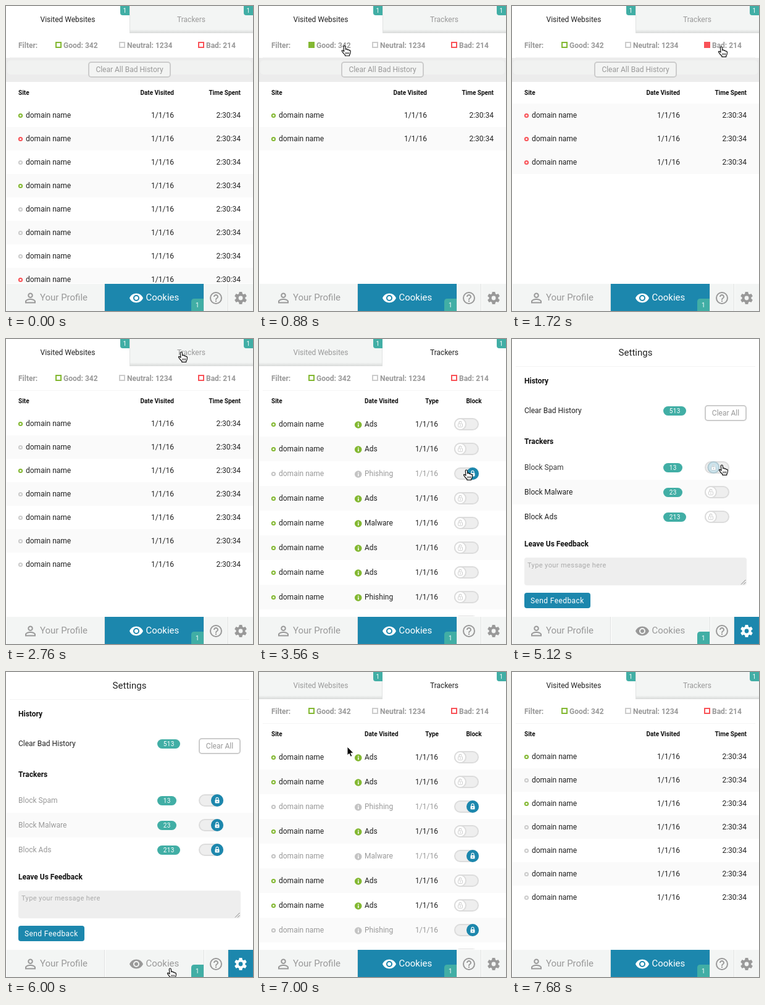
An HTML page for the animation above (9.68 s loop, 400x494 px).

```html
<!DOCTYPE html>
<html lang="en">
<head>
<meta charset="utf-8">
<title>Privacy dashboard</title>
<style>
  html, body { margin: 0; width: 100%; height: 100%; overflow: hidden; background: #fff; }
  svg { display: block; }
  text { font: 12px Roboto, Arial, sans-serif; fill: #222; }
  .b { font-weight: 700; fill: #111; }
  .h { font-size: 10px; font-weight: 700; fill: #111; }
  .mute { fill: #999; }
  .big { font-size: 15px; }
  .tiny { font-size: 10px; fill: #fff; letter-spacing: .4px; }
  .sp { letter-spacing: .4px; }
  .end { text-anchor: end; }
  .mid { text-anchor: middle; }
  .ink { fill: var(--ink, #222); }
  .btn { fill: #fff; stroke: #ccc; stroke-width: 2; }
</style>
</head>
<body>
<svg id="stage" width="400" height="494" viewBox="0 0 400 494"></svg>
<script>
const LOOP = 9680, STEP = 40;
const BLUE = '#1c87ad', TEAL = '#41aea5', PALE = '#f3f5f4', GREY = '#999999', INK = '#222222';
const TINT = { g: '#83b832', n: '#cccccc', b: '#f95257' };

// markup helpers
const text = (x, y, s, c = '') => `<text x="${x}" y="${y}" class="${c}">${s}</text>`;
const rect = (x, y, w, h, fill, more = '') =>
  `<rect x="${x}" y="${y}" width="${w}" height="${h}" fill="${fill}" ${more}/>`;
const stripe = (y, h) => rect(1, y, 399, h, '#fafafa');
const ring = (y, color) =>
  `<circle cx="23.5" cy="${y}" r="2.6" fill="none" stroke="${color}" stroke-width="2"/>`;
const icon = (x, y, d, id, s = 1) =>
  `<path id="${id}" transform="translate(${x - 12 * s} ${y - 12 * s}) scale(${s})" fill="${GREY}" d="${d}"/>`;

const badge = (x, y, size, down) => {
  const d = down ? `M0 0H${size}V${size}H4Q0 ${size} 0 ${size - 4}Z`
                 : `M0 ${size}V5Q0 0 5 0H${size}V${size}Z`;
  return `<g transform="translate(${x} ${y})"><path fill="${TEAL}" d="${d}"/>` +
    text(size / 2, size / 2 + 3.5, '1', 'tiny mid') + '</g>';
};

const lock = (color, open) =>
  `<rect x="-3.5" y="-1" width="7" height="5.5" rx=".8" fill="${open ? 'none' : color}" stroke="${color}" stroke-width="${open ? 1 : 0}"/>
   <path d="M-2 -1V-2.6A2 2 0 0 1 2 -2.6${open ? '' : 'V-1'}" fill="none" stroke="${color}" stroke-width="1.2"/>
   <circle cy="1.7" r=".9" fill="${open ? color : BLUE}"/>`;

const toggle = (x, y) => `<g transform="translate(${x} ${y})">
  <rect x="1" y="-9" width="38" height="18" rx="9" fill="#eee" stroke="#dcdcdc" stroke-width="2"/>
  <g class="knob"><circle r="9" fill="#fff" stroke="#dcdcdc" stroke-width="2"/>${lock('#cfcfcf', true)}
  <g class="on"><circle r="10" fill="${BLUE}"/>${lock('#fff', false)}</g></g></g>`;

const filterBox = (x, kind, label) =>
  `<rect id="box-${kind}" x="${x + 1}" y="59" width="8" height="8" fill="#fff" stroke="${TINT[kind]}" stroke-width="2"/>` +
  text(x + 13, 68, label, 'b mute');

// visited sites
const SITES = [...'gbngnnnbnb'].map((kind, i) => ({ kind, odd: i % 2 }));
const clean = SITES.filter(s => s.kind != 'b').map((s, i) => ({ kind: s.kind, odd: i % 2 }));
const lists = { all: SITES, clean };
for (const k of 'gnb') lists[k] = SITES.filter(s => s.kind == k);

const siteRow = (s, i) => {
  const y = 177 + 38 * i;
  return (s.odd ? stripe(y - 19, 38) : '') + ring(y + .5, TINT[s.kind]) +
    text(32, y + 4, 'domain name') + text(272, y + 4, '1/1/16', 'end') + text(380, y + 4, '2:30:34', 'end');
};

const sites = `<g id="sites">
  ${rect(0, 83, 400, 40, '#ececec')}${rect(2, 88, 396, 23, '#f1f2f1', 'rx="5"')}
  <rect class="btn" x="134" y="91" width="132" height="24" rx="4" style="fill:#f3f4f3"/>
  ${text(200, 107, 'Clear All Bad History', 'mute mid')}
  ${text(20, 144, 'Site', 'h')}${text(272, 144, 'Date Visited', 'h end')}${text(380, 144, 'Time Spent', 'h end')}
  ${Object.keys(lists).map(k => `<g id="list-${k}">${lists[k].map(siteRow).join('')}</g>`).join('')}</g>`;

// trackers
const TYPES = ['Ads', 'Ads', 'Phishing', 'Ads', 'Malware', 'Ads', 'Ads', 'Phishing', 'Ads'];
const trackerRow = (type, i) => {
  const y = 138 + 40 * i;
  return `<g id="track${i}">` + (i % 2 ? stripe(y - 20, 40) : '') + ring(y + .5, 'var(--tint)') +
    text(32, y + 4, 'domain name', 'ink') +
    `<circle cx="160.7" cy="${y + 1}" r="5.8" fill="var(--tint)"/>` +
    rect(160, y + .3, 1.6, 3.8, '#fff') + rect(160, y - 2.2, 1.6, 1.6, '#fff') +
    text(171, y + 4, type, 'ink') + text(290, y + 4, '1/1/16', 'ink end') + toggle(316, y) + '</g>';
};
const trackers = `<g id="trackers">
  ${text(20, 104, 'Site', 'h')}${text(171, 104, 'Date Visited', 'h')}
  ${text(291, 104, 'Type', 'h end')}${text(348, 104, 'Block', 'h mid')}
  ${TYPES.map(trackerRow).join('')}</g>`;

const tab = (x, id, label, edge) => `${rect(x, 0, 200, 44, '#fff')}
  <g id="${id}-off">${rect(x, 0, 200, 43, PALE)}${rect(x, 38, 200, 6, 'url(#sink)')}
  ${rect(edge, 0, 1, 43, '#e0e2e1')}</g>
  <text id="${id}-label" class="mid" x="${x + 100}" y="26">${label}</text>${badge(x + 185, 0, 15, true)}`;

const cookies = `<g id="cookies">${sites}${trackers}
  ${rect(0, 0, 400, 84, '#fff')}${rect(6, 83, 388, 1, '#f5f5f5')}
  ${tab(0, 'tab0', 'Visited Websites', 199)}${tab(200, 'tab1', 'Trackers', 200)}
  ${text(20, 68, 'Filter:', 'b mute')}
  ${filterBox(80, 'g', 'Good: 342')}${filterBox(183, 'n', 'Neutral: 1234')}${filterBox(311, 'b', 'Bad: 214')}</g>`;

// settings
const pill = (y, n) => {
  const w = n > 99 ? 37 : 31;
  return rect(245, y - 7.5, w, 15, TEAL, 'rx="7.5"') + text(245.2 + w / 2, y + 3.7, n, 'tiny mid');
};
const blockRow = ([label, n], i) => {
  const y = 208 + 40 * i;
  return `<g id="block${i}">` + (i % 2 ? stripe(y - 20, 40) : '') +
    text(20, y + 4, label, 'ink') + pill(y + .5, n) + toggle(312, y) + '</g>';
};
const settings = `<g id="settings">
  ${text(200, 27, 'Settings', 'big mid')}${rect(6, 44, 388, 1, '#f3f3f3')}
  ${text(20, 72, 'History', 'b')}${text(20, 120, 'Clear Bad History')}${pill(116.5, 513)}
  <rect class="btn" x="313" y="108" width="66" height="24" rx="4"/>${text(346, 124, 'Clear All', 'mute mid')}
  ${text(20, 170, 'Trackers', 'b')}
  ${[['Block Spam', 13], ['Block Malware', 23], ['Block Ads', 213]].map(blockRow).join('')}
  ${text(20, 336, 'Leave Us Feedback', 'b')}
  ${rect(20, 354, 360, 45, '#eee', 'rx="4"')}
  <text x="25" y="370" class="sp" style="font-size:11px;fill:#aaa">Type your message here</text>
  <path d="M371 397.5L378.5 390M375 397.5L378.5 394" stroke="#777" stroke-width=".9"/>
  ${rect(20, 411, 107, 25, BLUE, 'rx="4"')}
  <text x="30" y="428" class="sp" style="fill:#fff">Send Feedback</text></g>`;

// bottom bar
const PERSON = 'M12 5.9a2.1 2.1 0 1 1 0 4.2a2.1 2.1 0 1 1 0-4.2m0 9c2.97 0 6.1 1.46 6.1 2.1v1.1H5.9V17c0-.64 3.13-2.1 6.1-2.1M12 4a4 4 0 1 0 0 8a4 4 0 1 0 0-8zm0 9c-2.67 0-8 1.34-8 4v3h16v-3c0-2.66-5.33-4-8-4z';
const EYE = 'M12 4.5C7 4.5 2.73 7.61 1 12c1.73 4.39 6 7.5 11 7.5s9.27-3.11 11-7.5c-1.73-4.39-6-7.5-11-7.5zM12 17a5 5 0 1 1 0-10a5 5 0 1 1 0 10zm0-8a3 3 0 1 0 0 6a3 3 0 1 0 0-6z';
const HELP = 'M11 18h2v-2h-2v2zm1-16a10 10 0 1 0 0 20a10 10 0 1 0 0-20zm0 18a8 8 0 1 1 0-16a8 8 0 1 1 0 16zm0-14c-2.21 0-4 1.79-4 4h2c0-1.1.9-2 2-2s2 .9 2 2c0 2-3 1.75-3 5h2c0-2.25 3-2.5 3-5 0-2.21-1.79-4-4-4z';
const teeth = [0, 1, 2, 3, 4, 5].map(i =>
  `<path transform="rotate(${i * 60})" d="M-3 -6L-2.3 -10H2.3L3 -6Z"/>`).join('');
const divider = x => rect(x, 450, 1, 44, '#dfe1e0') + rect(x + 1, 450, 1, 44, '#fff');

const bar = `${rect(0, 449, 400, 45, '#fff')}${rect(1, 450, 399, 44, PALE)}
  ${divider(159)}${divider(320)}${divider(359)}
  <rect id="nav-cookies" x="160" y="450" width="160" height="44"/>
  <rect id="nav-gear" x="360" y="450" width="40" height="44"/>
  ${icon(39.5, 473, PERSON, 'person', 1.06)}${text(55, 477, 'Your Profile', 'big mute')}
  ${icon(211, 473, EYE, 'eye')}<text id="cookies-label" class="big" x="226.5" y="477">Cookies</text>
  ${icon(340, 473, HELP, 'help')}
  <g id="gear" transform="translate(380 473)">${teeth}
    <circle r="5.4" fill="none" stroke-width="4"/></g>
  ${badge(300, 474, 20, false)}`;

const cursor = `<g id="cursor" stroke-linejoin="round">
  <g id="hand"><path fill="#fff" stroke="#111" stroke-width="1.2" d="M-1.7 1.6Q-1.7 0 -.2 0Q1.2 0 1.3 1.6L1.8 6Q2 5 3.3 5.2Q4.5 5.4 4.7 6.6Q5 5.9 6 6.1Q7.2 6.3 7.3 7.6Q8 7 8.8 7.4Q9.6 8 9.5 9.5L9 12.5L7.8 15V16.3H.8V15L-2.5 11.5L-4.3 8.8Q-4.9 7.6 -3.8 7.3Q-2.8 7.1 -1 9.2Z"/>
  <path stroke="#111" d="M2 10.5V13.5M4.2 10.5V13.5M6.4 10.5V13.5"/></g>
  <path id="arrow" fill="#000" stroke="#fff" d="M0 0V14L3.2 11.2L5.4 16.2L7.8 15.2L5.6 10.3H10Z"/></g>`;

const stage = document.getElementById('stage');
stage.innerHTML = `<defs><linearGradient id="sink" x2="0" y2="1">
  <stop offset="0" stop-color="#d8dad9" stop-opacity="0"/><stop offset="1" stop-color="#d8dad9"/>
  </linearGradient></defs>${cookies}${settings}${bar}${cursor}`;
const el = {};
stage.querySelectorAll('[id]').forEach(n => el[n.id] = n);

// timing helpers
const seg = (t, a, b) => Math.min(1, Math.max(0, (t - a) / (b - a)));
const ease = p => p < .5 ? 2 * p * p : 1 - 2 * (1 - p) * (1 - p);
const glide = (t, a, b) => ease(seg(t, a, b));
const rgb = c => [1, 3, 5].map(i => parseInt(c.slice(i, i + 2), 16));
const mix = (a, b, p) => {
  const to = rgb(b);
  return `rgb(${rgb(a).map((v, i) => Math.round(v + (to[i] - v) * p))})`;
};
const move = (n, x, y = 0) => n.setAttribute('transform', `translate(${x} ${y})`);
const show = (n, on) => n.style.display = on ? '' : 'none';

// pointer: arrival window, then position
const START = [100, 38];
const MOVES = [
  [80, 320, 112, 64], [840, 960, 232, 66], [1440, 1520, 339, 66], [1960, 2160, 204, 98],
  [2480, 2760, 284, 21], [3160, 3400, 336, 212], [3600, 3760, 340, 294], [3960, 4240, 384, 481],
  [4800, 5040, 340, 204], [5200, 5280, 340, 244], [5440, 5520, 340, 284], [5680, 6000, 266, 480],
  [6480, 7000, 143, 121], [7000, 7160, 104, 24]
];
const ARROW = [[80, 240], [3220, 3360], [4030, 4200], [4880, 5000], [5720, 5960], [6560, 7080]];
const TRACK_ON = { 2: 3440, 4: 3800, 7: 5560 };
const BLOCK_ON = [5080, 5320, 5560];

function setToggle(row, p) {
  row.style.setProperty('--ink', mix(INK, GREY, p));
  row.style.setProperty('--tint', mix(TINT.g, '#c4c4c4', p));
  move(row.querySelector('.knob'), 10 + 20 * p);
  row.querySelector('.on').style.opacity = p;
}

function setTab(id, active) {
  el[id + '-off'].style.opacity = 1 - active;
  el[id + '-label'].style.fill = mix(GREY, INK, active);
}

function render(t) {
  const page = glide(t, 4360, 4765) - glide(t, 6080, 6480);
  const tabs = glide(t, 2960, 3320) - glide(t, 7240, 7680);
  const nav = seg(t, 4400, 4800) - seg(t, 6080, 6480);

  move(el.cookies, -400 * page);
  move(el.settings, 400 * (1 - page));
  move(el.sites, -400 * tabs, -40 * glide(t, 2240, 2440));
  move(el.trackers, 400 * (1 - tabs));
  setTab('tab0', 1 - tabs);
  setTab('tab1', tabs);

  const picked = t < 520 ? '' : t < 1200 ? 'g' : t < 1680 ? 'n' : t < 2240 ? 'b' : '';
  for (const k of 'gnb') el['box-' + k].style.fill = picked == k ? TINT[k] : '#fff';
  const list = t < 560 ? 'all' : t < 1200 ? 'g' : t < 1720 ? 'n' : t < 2240 ? 'b' : 'clean';
  for (const k in lists) show(el['list-' + k], k == list);

  TYPES.forEach((_, i) => {
    const at = TRACK_ON[i];
    setToggle(el['track' + i], at ? glide(t, at, at + 120) : 0);
  });
  BLOCK_ON.forEach((at, i) => setToggle(el['block' + i], glide(t, at, at + 120)));

  el['nav-cookies'].style.fill = BLUE;
  el['nav-cookies'].style.opacity = 1 - nav;
  el['nav-gear'].style.fill = BLUE;
  el['nav-gear'].style.opacity = nav;
  el.eye.style.fill = el['cookies-label'].style.fill = mix('#ffffff', GREY, nav);
  el.gear.style.fill = el.gear.style.stroke = mix(GREY, '#ffffff', nav);
  el.gear.style.strokeWidth = 0;

  let [x, y] = START;
  for (const [a, b, tx, ty] of MOVES) {
    const p = a >= 6480 ? seg(t, a, b) : glide(t, a, b);
    x += (tx - x) * p;
    y += (ty - y) * p;
  }
  const arrow = ARROW.some(([a, b]) => t >= a && t < b);
  show(el.cursor, t >= 80 && t < 7680);
  show(el.arrow, arrow);
  show(el.hand, !arrow);
  move(el.cursor, x, y);
}

const begin = performance.now();
function tick() {
  const t = (performance.now() - begin) % LOOP;
  render(Math.floor(t / STEP) * STEP);
  requestAnimationFrame(tick);
}
tick();
</script>
</body>
</html>
```
